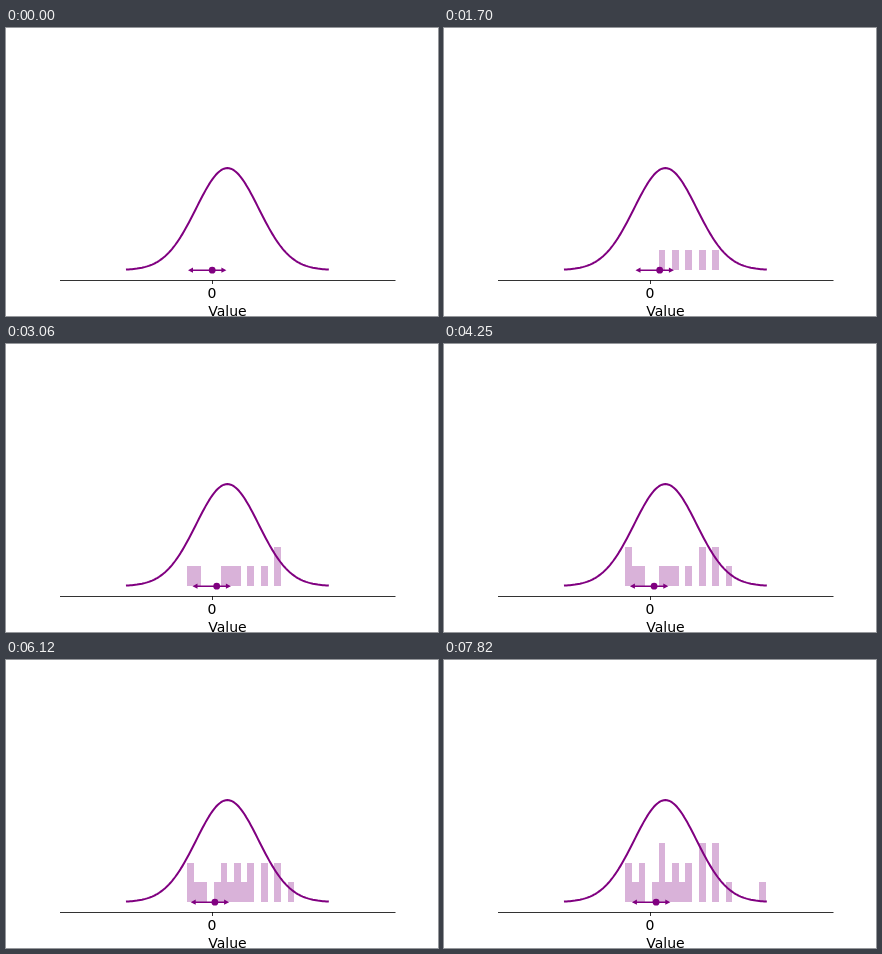
These frames come from a looping animation (432 px wide and 288 px high, 7990 ms). An HTML page:

```html
<!DOCTYPE html>
<html lang="en">
<head>
<meta charset="utf-8">
<title>Sampled value estimate</title>
<style>
  html, body { margin: 0; width: 100%; height: 100%; overflow: hidden; background: #fff; }
  svg { display: block; width: 432px; height: 288px; }
  text { font: 14px "DejaVu Sans", sans-serif; text-anchor: middle; }
</style>
</head>
<body>
<svg viewBox="0 0 432 288">
  <path id="bars" fill="#800080" fill-opacity=".3" shape-rendering="crispEdges"/>
  <path d="M54 252.5H389.5M206.5 252V256" stroke="#000" stroke-opacity=".8" fill="none"/>
  <path id="curve" fill="none" stroke="#800080" stroke-width="2" stroke-linecap="square" stroke-linejoin="round"/>
  <g id="marker" fill="#800080">
    <path d="M-21 0H11" stroke="#800080" stroke-width="1.5"/>
    <path d="M-24.2 0L-19.2 -2.6V2.6ZM14.2 0L9.2 -2.6V2.6Z"/>
    <circle r="3.4"/>
  </g>
  <text x="206" y="270">0</text>
  <text x="221.4" y="288">Value</text>
</svg>
<script>
  const STEP = 170, STEPS = 47;
  const LEFT = 54, BIN = 6.696, BASE = 242, UNIT = 19.6;
  const MEAN = 221.4, SIGMA = 31.2, PEAK = 102;
  const START = 206.2, UP = 1.9, DOWN = 4.4;

  // Histogram bin of each drawn sample, in order.
  const samples = [30, 28, 32, 24, 26, 19, 25, 20, 32, 34, 30, 19,
                   21, 27, 24, 28, 26, 23, 21, 32, 24, 30, 39];

  const $ = id => document.getElementById(id);
  const bars = $('bars'), marker = $('marker');
  const edge = bin => LEFT + bin * BIN;

  function bell() {
    const pts = [];
    for (let i = 0; i <= 120; i++) {
      const x = edge(10 + i / 4), z = (x - MEAN) / SIGMA;
      pts.push(x.toFixed(2) + ' ' + (BASE + 0.1 - PEAK * Math.exp(-z * z / 2)).toFixed(2));
    }
    return 'M' + pts.join('L');
  }

  function histogram(n) {
    const counts = {};
    for (const bin of samples.slice(0, n)) counts[bin] = (counts[bin] || 0) + 1;
    return Object.entries(counts).map(([bin, count]) => {
      const x0 = Math.round(edge(+bin)), x1 = Math.round(edge(+bin + 1));
      return `M${x0} ${BASE}V${Math.round(BASE - UNIT * count)}H${x1}V${BASE}Z`;
    }).join('');
  }

  // Each sample nudges the estimate by a fixed, asymmetric amount.
  const estimate = n => samples.slice(0, n).reduce(
    (x, bin) => x + (edge(bin + 0.5) > x ? UP : -DOWN), START);

  // Odd steps draw a sample, even steps move the estimate.
  function draw(step) {
    bars.setAttribute('d', histogram(Math.ceil(step / 2)));
    marker.setAttribute('transform', `translate(${estimate(Math.floor(step / 2)).toFixed(2)} 242.2)`);
  }

  let shown = 0;
  const t0 = performance.now();
  function tick() {
    const step = Math.floor((performance.now() - t0) / STEP) % STEPS;
    if (step !== shown) draw(shown = step);
    requestAnimationFrame(tick);
  }

  $('curve').setAttribute('d', bell());
  draw(0);
  requestAnimationFrame(tick);
</script>
</body>
</html>
```
